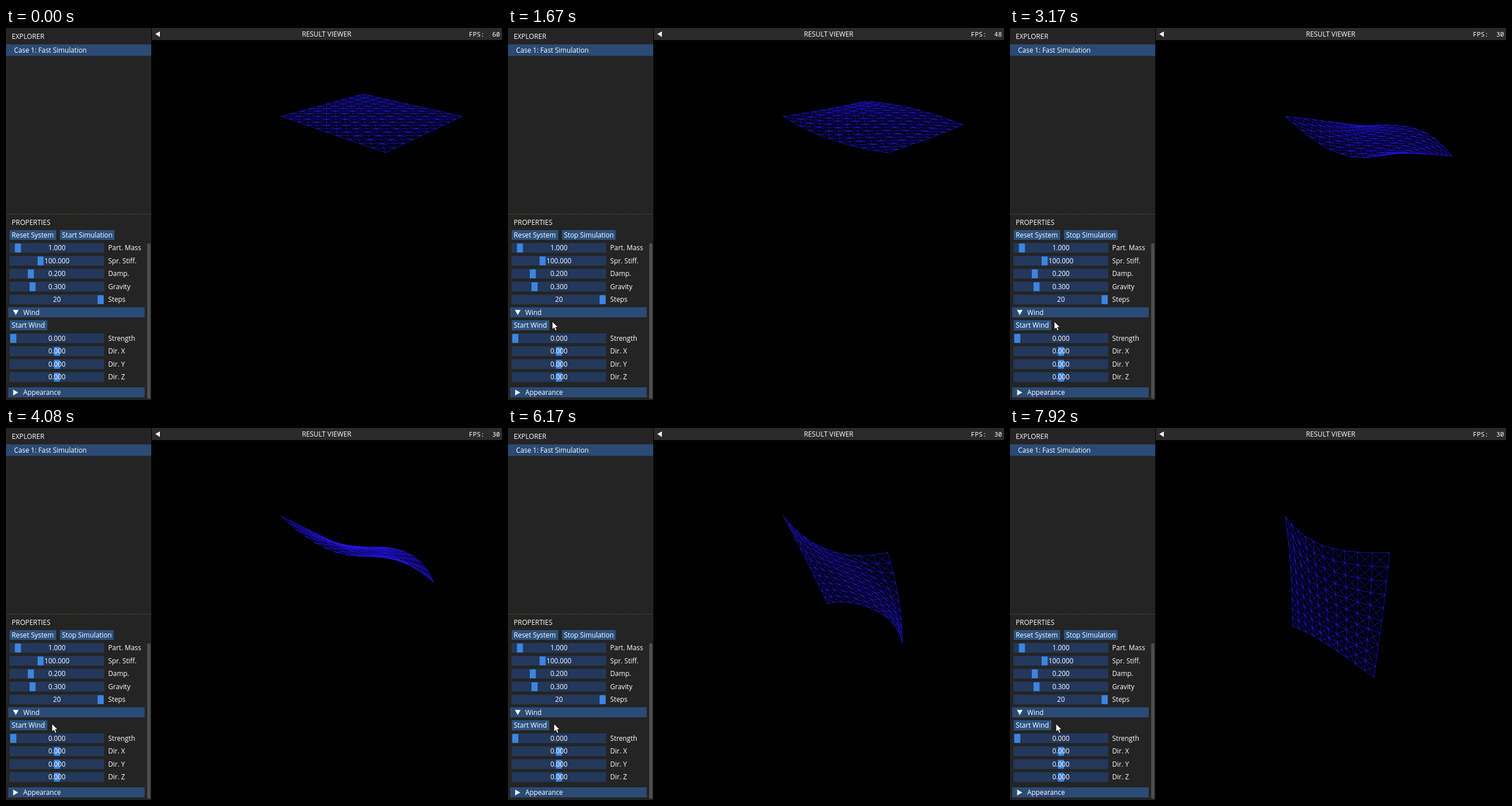
Animation, 864 px wide and 648 px high, one loop 8000 ms. Source, as an HTML page:

```html
<!DOCTYPE html>
<html lang="en">
<head>
<meta charset="utf-8">
<title>Cloth simulation</title>
<style>
html, body { margin: 0; width: 100%; height: 100%; overflow: hidden; background: #000; }
svg { display: block; width: 864px; height: 648px; }
text { font: 11.8px "Open Sans", "Noto Sans", sans-serif; fill: #fff; white-space: pre; }
.mid { text-anchor: middle; }
.end { text-anchor: end; }
.mono { font: 11.2px "Noto Sans Mono", monospace; }
.panel { fill: #242424; }
.bar { fill: #2b2b2b; }
.header { fill: #2b4b75; }
.button { fill: #2d5380; }
.button.hover { fill: #4296fa; }
.frame { fill: #23385a; }
.grab { fill: #3d85e0; }
.scroll { fill: #4f4f4f; }
.white { fill: #fff; }
#springs { fill: none; stroke: #1d14e2; stroke-width: .8; }
#nodes { fill: none; stroke: #a01450; stroke-width: 1.2; stroke-linecap: square; opacity: .75; }
</style>
</head>
<body>
<svg viewBox="0 0 864 648">
  <g id="ui"></g>
  <path id="springs"/>
  <path id="nodes"/>
  <path id="cursor" d="M0 0V14.2L3.3 11.2L5.7 16.4L8.2 15.3L5.9 10.3H10.2Z" fill="#fff" stroke="#000" stroke-width=".9"/>
</svg>
<script>
const LOOP = 8000, STEP = LOOP / 96, CELLS = 10, START = 720;
const $ = id => document.getElementById(id);

// Interface
const rect = (cls, x, y, w, h, extra = '') =>
  `<rect class="${cls}" x="${x}" y="${y}" width="${w}" height="${h}" ${extra}/>`;
const text = (s, x, y, cls = '', id = '') => `<text x="${x}" y="${y}" class="${cls}" id="${id}">${s}</text>`;
const shape = d => `<path class="white" d="${d}"/>`;

function slider(label, value, grabX, y) {
  return rect('frame', 6, y - 8.5, 165, 17) + rect('grab', grabX, y - 7.5, 10.5, 15.5) +
    text(value, 88.8, y + 4, 'mid') + text(label, 178, y + 4);
}

$('ui').innerHTML = [
  rect('panel', 0, 0, 253, 648),
  rect('bar', 254, 0, 610, 21),
  shape('M260 10.5L268 6V15.5Z'),
  text('RESULT VIEWER', 558.5, 15, 'mid'),
  text('FPS:', 806.5, 15, 'mono'),
  text('60', 860.5, 15, 'mono end', 'fps'),
  text('EXPLORER', 10, 18.5),
  rect('header', 0, 28.5, 253, 20),
  text('Case 1: Fast Simulation', 14, 43),
  '<path d="M0 324.5H253" stroke="#5c5c32" stroke-dasharray="2 2"/>',
  text('PROPERTIES', 10, 342.5),
  rect('button', 6.5, 352, 81, 17),
  text('Reset System', 10, 364.5),
  rect('button', 94, 352, 95, 17, 'id="run"'),
  text('Start Simulation', 97.5, 364.5, '', 'runLabel'),
  slider('Part. Mass', '1.000', 15.5, 383),
  slider('Spr. Stiff.', '100.000', 55, 405.5),
  slider('Damp.', '0.200', 38, 428),
  slider('Gravity', '0.300', 41, 450.5),
  slider('Steps', '20', 159.5, 473),
  rect('header', 4, 486.5, 237.5, 17.5),
  shape('M12 491H22L17 500Z'),
  text('Wind', 30, 499.5),
  rect('button', 6.5, 509, 65.5, 17.5),
  text('Start Wind', 10, 522),
  slider('Strength', '0.000', 7.5, 540.5),
  slider('Dir. X', '0.000', 83.5, 563),
  slider('Dir. Y', '0.000', 83.5, 585.5),
  slider('Dir. Z', '0.000', 83.5, 608),
  rect('header', 4, 626, 237.5, 17.5),
  shape('M12.5 630L21.5 635L12.5 640Z'),
  text('Appearance', 30, 639),
  rect('scroll', 246, 375, 5.5, 271, 'rx="2.7"')
].join('');

// Cloth: u runs along the pinned edge, v towards the free edge.
const U = [0, 1 / 3, 2 / 3, 1], V = [0, .5, 1];

// Flat sheet in perspective: corner x, y and depth.
const corners = [[480, 154, 1], [661, 217, .764], [622, 115, 1.236], [794, 154, 1]];
function flat(u, v) {
  const k = [(1 - u) * (1 - v), u * (1 - v), (1 - u) * v, u * v];
  let x = 0, y = 0, w = 0;
  corners.forEach((c, i) => {
    const m = k[i] * c[2];
    x += m * c[0]; y += m * c[1]; w += m;
  });
  return [x / w, y / w];
}

// Control points per pose: two on the pinned edge, four across the middle, four on the free edge.
const poses = [
  [1170, [530, 173, 590, 194, 558.5, 134.5, 609, 147.5, 667, 163.5, 736, 183, 622, 117.5, 671.5, 128, 728, 141, 794, 157]],
  [2170, [530, 189, 591, 211.5, 560, 148, 609, 163, 667, 180, 735, 200.5, 620, 140.5, 671, 141.5, 727, 154, 788, 183]],
  [3170, [528, 194, 589, 223, 556, 163, 606, 186, 664, 199, 726, 220, 612, 171, 663, 169, 718, 180, 769, 223]],
  [5170, [526, 190.5, 585, 214.5, 543, 222, 583, 228, 641, 241, 699, 277, 585, 267, 628, 257, 682, 271, 714, 324]],
  [6170, [521, 193.5, 582, 219.5, 526, 243, 568, 252, 628, 274, 681, 303, 557, 306, 601, 305, 654, 326, 687, 374]],
  [7917, [518.5, 191.5, 575, 212.5, 490, 262, 527, 287, 580, 313, 647.5, 336, 492, 345, 533, 365, 581, 396, 634, 434]]
];

const controls = V.flatMap((v, j) => U.map((u, i) => ({ u, v, i, j })))
  .filter(c => c.v > 0 || (c.u > 0 && c.u < 1));
const rest = controls.flatMap(c => flat(c.u, c.v));
const still = rest.map(() => 0);
const keys = [[0, still], [START, still],
  ...poses.map(([t, p]) => [t, p.map((n, i) => n - rest[i])])];

const lagrange = (knots, x) => knots.map((a, i) =>
  knots.reduce((p, b, j) => i === j ? p : p * (x - b) / (a - b), 1));

const sheet = [];
for (let r = 0; r <= CELLS; r++)
  for (let c = 0; c <= CELLS; c++) {
    const u = c / CELLS, v = r / CELLS, bu = lagrange(U, u), bv = lagrange(V, v);
    sheet.push({ home: flat(u, v), weights: controls.map(k => bu[k.i] * bv[k.j]) });
  }

const springs = [];
for (let r = 0; r <= CELLS; r++)
  for (let c = 0; c <= CELLS; c++) {
    const n = r * (CELLS + 1) + c, below = n + CELLS + 1;
    if (c < CELLS) springs.push([n, n + 1]);
    if (r < CELLS) springs.push([n, below]);
    if (c < CELLS && r < CELLS) springs.push([n, below + 1], [n + 1, below]);
  }

function slope(k, i) {
  if (k <= 1) return 0;
  const a = keys[k - 1], b = keys[Math.min(k + 1, keys.length - 1)];
  return (b[1][i] - a[1][i]) / (b[0] - a[0]);
}

function offsets(t) {
  let k = 0;
  while (k < keys.length - 2 && t >= keys[k + 1][0]) k++;
  const [t0, a] = keys[k], [t1, b] = keys[k + 1], d = t1 - t0;
  const s = Math.min(1, (t - t0) / d), s2 = s * s, s3 = s2 * s;
  return a.map((p, i) => p * (2 * s3 - 3 * s2 + 1) + b[i] * (3 * s2 - 2 * s3) +
    d * (slope(k, i) * (s3 - 2 * s2 + s) + slope(k + 1, i) * (s3 - s2)));
}

function drawCloth(t) {
  const off = offsets(t);
  const pts = sheet.map(({ home, weights }) => {
    let [x, y] = home;
    weights.forEach((w, i) => { x += w * off[2 * i]; y += w * off[2 * i + 1]; });
    return x.toFixed(1) + ' ' + y.toFixed(1);
  });
  $('springs').setAttribute('d', springs.map(([a, b]) => `M${pts[a]}L${pts[b]}`).join(''));
  $('nodes').setAttribute('d', pts.map(p => `M${p}h.01`).join(''));
}

// Pointer
const track = [[300, 160, 420], [480, 140, 362], [780, 140, 362], [1080, 74, 509],
  [1420, 74, 509], [1740, 77, 511], [3420, 77, 511], [4200, 80, 515], [LOOP, 80, 515]];

function drawCursor(t) {
  const shown = t >= track[0][0];
  $('cursor').style.display = shown ? '' : 'none';
  if (!shown) return;
  const k = track.findIndex(p => p[0] > t), a = track[k - 1], b = track[k];
  const s = (t - a[0]) / (b[0] - a[0]), e = s * s * (3 - 2 * s);
  const at = i => Math.round(a[i] + (b[i] - a[i]) * e);
  $('cursor').setAttribute('transform', `translate(${at(1)} ${at(2)})`);
}

function draw(t) {
  const running = t >= START;
  $('runLabel').textContent = running ? 'Stop Simulation' : 'Start Simulation';
  $('run').setAttribute('width', running ? 93.5 : 95);
  $('run').classList.toggle('hover', t > 450 && t < 820);
  $('fps').textContent = t < 990 ? 60 : t < 1990 ? 48 : 30;
  drawCloth(t);
  drawCursor(t);
}

const begin = performance.now();
let shownStep = -1;
function tick() {
  const step = Math.floor(((performance.now() - begin) % LOOP + 4) / STEP) % 96;
  if (step !== shownStep) draw((shownStep = step) * STEP);
  requestAnimationFrame(tick);
}
tick();
</script>
</body>
</html>
```
